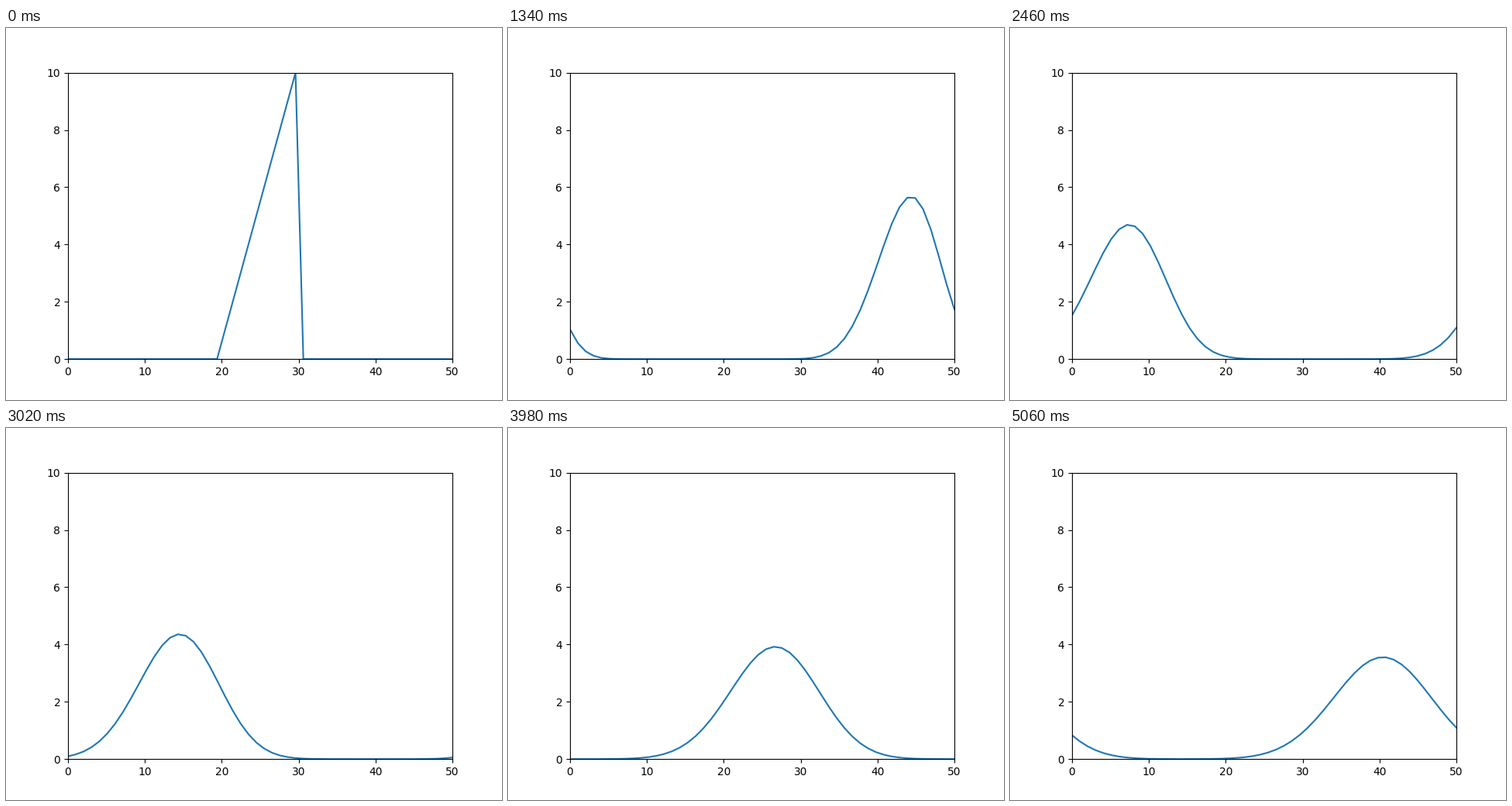
Recreate the animation shown at these times as a matplotlib script. Size 640 px wide and 480 px high, loop 5.1 s.

```python
import numpy as np
import matplotlib.pyplot as plt
from matplotlib.animation import FuncAnimation

POINTS = 50
STATES = 128
COURANT = 0.5
INTERVAL = 20  # ms; the first state is held for one tick, all others for two


def initial_wave():
    u = np.zeros(POINTS)
    u[19:30] = np.arange(11)
    return u


def advect(u):
    """One first-order upwind step with periodic ends."""
    return u - COURANT * (u - np.roll(u, 1))


waves = [initial_wave()]
for _ in range(STATES - 1):
    waves.append(advect(waves[-1]))

fig, ax = plt.subplots(figsize=(6.4, 4.8), dpi=100)
ax.set_xlim(0, 50)
ax.set_ylim(0, 10)
x = np.linspace(0, 50, POINTS)
line, = ax.plot(x, waves[0])


def update(tick):
    line.set_ydata(waves[(tick + 1) // 2])
    return line,


def init():
    return update(0)


anim = FuncAnimation(fig, update, frames=2 * STATES - 1, init_func=init,
                     interval=INTERVAL, repeat=True, repeat_delay=0)
plt.show()
```
